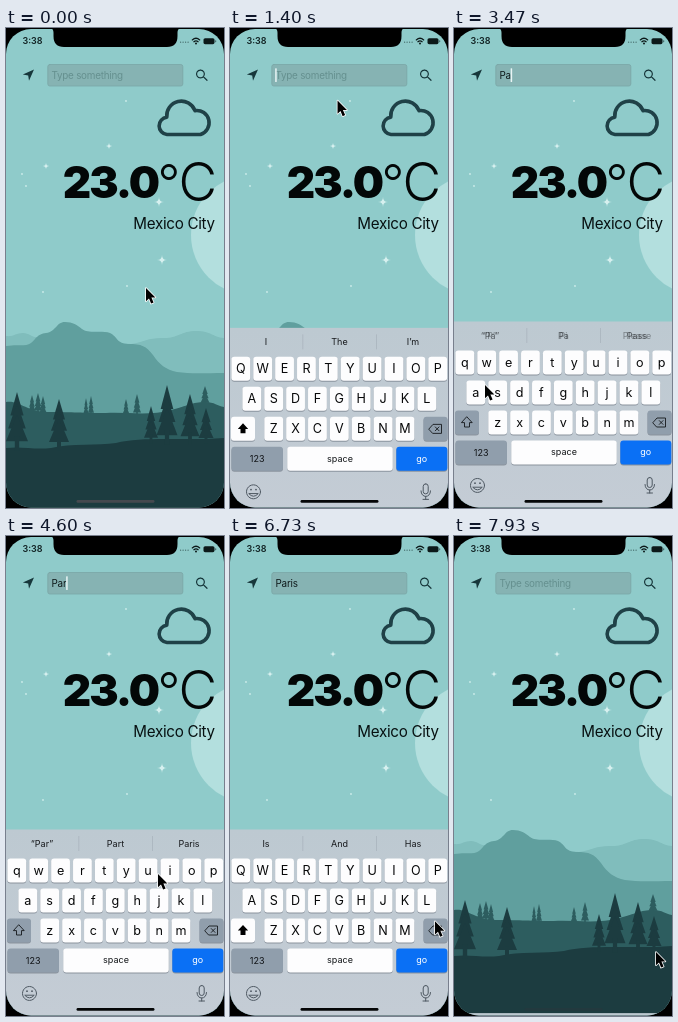
An HTML page with a canvas that plays this animation: 218 by 480 pixels, repeating every 8000 ms.

```html
<!DOCTYPE html>
<html lang="en">
<head>
<meta charset="utf-8">
<title>Weather search</title>
<style>
html, body { margin: 0; width: 100%; height: 100%; overflow: hidden; background: #000; }
canvas { display: block; width: 100%; height: 100%; }
</style>
</head>
<body>
<canvas id="stage"></canvas>
<script>
const W = 218, H = 480, LOOP = 8000, KEYS_TOP = 293.5;
const canvas = document.getElementById('stage');
const c = canvas.getContext('2d');
const dpr = window.devicePixelRatio || 1;
canvas.width = W * dpr;
canvas.height = H * dpr;

const DARK = '#1c3c40';
const FONT = 'Inter, Roboto, sans-serif';
const SHOW = 1112, HIDE = 7590;

// Typing steps: start time, field text, capitals on, suggestions
const steps = [
  [0, '', true, ['I', 'The', 'I’m']],
  [2480, 'P', false, ['“P”', 'Pi', 'Please']],
  [3370, 'Pa', false, ['“Pa”', 'Pa', 'Pass']],
  [4190, 'Par', false, ['“Par”', 'Part', 'Paris']],
  [4760, 'Pari', false, ['“Pari”', 'Party', 'Paris']],
  [5190, 'Paris', false, ['“Paris”', 'Parish', 'Paris']],
  [6210, 'Paris ', true, ['Is', 'And', 'Has']],
  [6860, 'Paris', false, ['“Paris”', 'Parish', 'Paris']],
  [7480, '', true, ['I', 'The', 'I’m']]
];

// Key presses: start, end, key
const presses = [
  [2400, 2480, 'P'], [3290, 3370, 'a'], [4110, 4190, 'r'], [4680, 4760, 'i'],
  [5110, 5190, 's'], [6770, 6860, 'del'], [7390, 7480, 'go']
];

// Pointer path: time, x, y
const path = [
  [0, 140, 260], [300, 140, 260], [900, 98, 45], [1250, 98, 45],
  [2050, 200, 340], [2500, 202, 338], [2650, 202, 338], [3250, 25, 362],
  [3380, 26, 361], [3470, 31, 357], [3950, 76, 338], [4220, 76, 338],
  [4600, 152, 338], [4670, 161, 337], [4790, 161, 337], [5090, 44, 364],
  [5220, 44, 364], [5750, 205, 391], [5850, 205, 391], [6130, 186, 307],
  [6250, 186, 307], [6660, 205, 385], [6880, 205, 386], [7250, 202, 416],
  [8000, 202, 416]
];

const clamp = v => Math.max(0, Math.min(1, v));
const smooth = v => v * v * (3 - 2 * v);
const spring = ms => {
  const k = Math.max(0, ms) * 0.018;
  return 1 - (1 + k) * Math.exp(-k);
};

function text(s, x, y, size, color, align = 'center', weight = 400, spacing = 0) {
  c.font = `${weight} ${size}px ${FONT}`;
  c.letterSpacing = spacing + 'px';
  c.textAlign = align;
  c.fillStyle = color;
  c.fillText(s, x, y);
  const width = c.measureText(s).width;
  c.letterSpacing = '0px';
  return width;
}

function box(x, y, w, h, r, color) {
  c.beginPath();
  c.roundRect(x, y, w, h, r);
  c.fillStyle = color;
  c.fill();
}

function disc(x, y, r, color) {
  c.beginPath();
  c.arc(x, y, r, 0, 7);
  c.fillStyle = color;
  c.fill();
}

function shape(d, color) {
  c.fillStyle = color;
  c.fill(new Path2D(d));
}

function line(d, color, width) {
  c.strokeStyle = color;
  c.lineWidth = width;
  c.lineCap = c.lineJoin = 'round';
  c.stroke(new Path2D(d));
}

function sparkle(x, y, r) {
  c.beginPath();
  c.moveTo(x, y - r);
  for (const [dx, dy] of [[r, 0], [0, r], [-r, 0], [0, -r]])
    c.quadraticCurveTo(x, y, x + dx, y + dy);
  c.fillStyle = '#d6f0ef';
  c.fill();
}

function tree(x, top, base, w, color) {
  const h = base - top, tiers = 3;
  c.fillStyle = color;
  for (let i = 0; i < tiers; i++) {
    const half = w / 2 * (0.6 + 0.2 * i);
    const y0 = top + h * 0.2 * i, y1 = top + h * (0.42 + 0.23 * i);
    c.beginPath();
    c.moveTo(x, y0);
    c.lineTo(x + half, y1);
    c.lineTo(x - half, y1);
    c.fill();
  }
  c.fillRect(x - w * 0.1, top + h * 0.8, w * 0.2, h * 0.25);
}

function scenery() {
  c.fillStyle = '#8fcbca';
  c.fillRect(0, 0, W, H);
  disc(245, 207, 60, '#b3dfde');
  sparkle(103, 118, 3.5);
  sparkle(40, 138, 3.5);
  sparkle(153, 174, 5);
  sparkle(156, 232, 5);
  for (const [x, y] of [[20, 158], [37, 264], [121, 258], [16, 146], [120, 73]])
    disc(x, y, 0.9, '#cdeceb');

  shape('M0 308C7 309 10 305 17 305C24 305 25 310 33 309L125 316C138 314 142 310 155 310C172 311 174 303 190 303C206 303 206 309 218 310V400H0Z', '#80bdbc');
  shape('M0 318C12 316 19 319 25 315C30 311 31 306 40 305C50 304 50 294 59 294C67 294 71 297 76 301C82 306 96 302 104 305C112 309 110 315 122 316C136 316 140 318 147 327C153 336 160 342 171 344C184 346 200 345 218 345V400H0Z', '#609f9e');

  const mid = '#2d5d5f';
  for (const [x, top, base, w] of [[26, 367, 385, 7], [32, 365, 385, 8], [37, 368, 387, 7],
    [80, 370, 387, 5], [85, 368, 387, 6], [120, 371, 387, 6], [131, 366, 387, 8], [199, 358, 377, 9]])
    tree(x, top, base, w, mid);
  shape('M0 374C14 372 20 384 42 384C68 384 76 385 100 385C122 384 145 388 165 382C182 378 186 374 199 374C209 374 211 378 218 379V440H0Z', mid);
  shape('M0 420C16 418 28 422 45 420C65 415 92 418 110 415C136 408 180 413 218 410V480H0Z', DARK);
  for (const [x, top, base, w] of [[11, 364, 420, 22], [53, 371, 420, 20],
    [145, 378, 414, 14], [161, 357, 414, 21], [184, 366, 414, 19], [200, 380, 414, 15]])
    tree(x, top, base, w, DARK);
}

function weather() {
  line('M161 106.5A8.7 8.7 0 0 1 160.8 89.2A14.6 14.6 0 0 1 189 82.6A12.3 12.3 0 0 1 194.5 106.5Z', '#1f4147', 3.6);
  text('23.0', 56.8, 170, 44, '#030707', 'left', 900, -2);
  text('°', 163, 173, 50, '#030707', 'center', 300);
  text('C', 211, 173, 53, '#030707', 'right', 300);
  text('Mexico City', 208.8, 201, 15.2, '#071011', 'right', 400, -0.3);
}

function searchBar(t, step) {
  shape('M28 41.5L16.8 46.6L22.2 47.4L23 52.8Z', '#17373b');
  line('M194.4 42.1A3.9 3.9 0 1 0 194.5 42.1M197.4 48.8L201 52.3', '#17373b', 1.2);
  box(41.8, 36.5, 135, 21.5, 2, '#86b3b3');
  c.strokeStyle = '#7aa6a6';
  c.lineWidth = 0.8;
  c.stroke();
  const value = step[1];
  let w = 0;
  if (value) w = text(value, 45.5, 51, 9.9, '#101b1c', 'left', 400, -0.2);
  else text('Type something', 45.5, 51, 9.9, '#65908f', 'left', 400, -0.25);

  const since = t - Math.max(step[0], SHOW - 20);
  if (t > SHOW - 20 && t < 7480 && since % 1000 < 520)
    box(45.2 + w, 40.3, 1.5, 13.7, 0.5, '#e9f5f5');
}

function statusBar() {
  shape('M43 0C46.5 0 47.5 2 47.5 5V8Q47.5 19 58 19H161Q171.5 19 171.5 8V5C171.5 2 172.5 0 176 0Z', '#000');
  text('3:38', 26.5, 16.4, 9, '#122324', 'center', 600);
  for (let i = 0; i < 4; i++) disc(174.6 + i * 2.5, 14.2, 0.65, '#426867');
  line('M186.3 11.9Q190 8.7 193.7 11.9M187.9 13.7Q190 12 192.1 13.7', '#0c1919', 1.3);
  disc(190, 15.4, 1, '#0c1919');
  box(197.5, 10.2, 11, 6, 1.6, '#0c1919');
  box(209.2, 12.2, 1, 2, 0.5, '#3a5b5b');
}

function key(x, y, w, fill = '#fdfdfe') {
  box(x - w / 2, y - 11, w, 24, 3, '#8b949e');
  box(x - w / 2, y - 12, w, 24, 3, fill);
}

function keyPositions(caps) {
  const list = [];
  [['qwertyuiop', 10.8, 334.5], ['asdfghjkl', 21.8, 364.5], ['zxcvbnm', 43.7, 394.5]]
    .forEach(([row, x, y]) => [...row].forEach((ch, i) =>
      list.push([caps ? ch.toUpperCase() : ch, x + i * 21.88, y])));
  return list;
}

function suggestions(t, i) {
  const mix = clamp((t - steps[i][0]) / 170);
  const draw = (words, alpha) => {
    c.globalAlpha = alpha;
    words.forEach((s, k) => text(s, 36 + 73.5 * k, 311, 9, '#17191c'));
    c.globalAlpha = 1;
  };
  if (i && mix < 1) draw(steps[i - 1][3], 1 - mix);
  draw(steps[i][3], i ? mix : 1);
  c.fillStyle = '#a7b1bb';
  c.fillRect(72.5, 300, 0.7, 15);
  c.fillRect(146, 300, 0.7, 15);
}

function keyboard(t, i) {
  const shown = t < 4000 ? spring(t - SHOW) : 1 - spring(t - HIDE);
  if (shown <= 0.003) return;
  const caps = steps[i][2];
  const press = presses.find(p => t >= p[0] && t < p[1] + 30);
  const down = press ? press[2] : '';
  const grey = '#909eac';

  c.save();
  c.translate(0, (1 - shown) * (H - KEYS_TOP));
  const back = c.createLinearGradient(0, KEYS_TOP, 0, H);
  back.addColorStop(0, '#bdc9d1');
  back.addColorStop(1, '#c4ccd5');
  c.fillStyle = back;
  c.fillRect(0, KEYS_TOP, W, H);
  suggestions(t, i);

  const letters = keyPositions(caps);
  for (const [ch, x, y] of letters) {
    key(x, y, 18.8);
    text(ch, x, y + 4.4, 12.6, '#08090a');
  }

  key(13, 394.5, 24, caps ? '#fdfdfe' : grey);
  const arrow = 'M13 389L18.2 394.6H15.5V399H10.5V394.6H7.8Z';
  if (caps) shape(arrow, '#000');
  else line(arrow, '#16191c', 0.9);
  key(205.5, 394.5, 24, down === 'del' ? '#fdfdfe' : grey);
  line('M199 394.5L203 390H211.5V399H203ZM205.3 392.6L209 396.4M209 392.6L205.3 396.4', '#16191c', 0.9);

  key(27.2, 424.5, 51.5, grey);
  text('123', 27.2, 427.5, 9, '#111417');
  key(110, 424.5, 105.5);
  text('space', 110, 427.2, 9, '#111417');
  key(191.8, 424.5, 51, down === 'go' ? '#fdfdfe' : '#0a70f5');
  text('go', 191.8, 427.2, 9, down === 'go' ? '#111417' : '#fff');

  line('M30.5 457.5A7 7 0 1 1 30.5 457.4M19 459.5Q23.5 464.5 28 459.5Z', '#4e5862', 1);
  disc(21, 455.2, 0.9, '#4e5862');
  disc(26, 455.2, 0.9, '#4e5862');
  c.beginPath();
  c.roundRect(193.2, 449.5, 5, 10, 2.5);
  c.stroke();
  line('M191 456.5C191 464 200.5 464 200.5 456.5M195.7 462V465M193 465H198.5', '#4e5862', 1);

  const popped = letters.find(l => l[0].toLowerCase() === down.toLowerCase());
  if (popped) {
    const [, x, y] = popped;
    const px = Math.max(16, Math.min(W - 16, x));
    box(px - 15, y - 43, 30, 31, 5, '#fdfdfe');
    box(x - 9.4, y - 16, 18.8, 28, 3, '#fdfdfe');
    text(down, px, y - 21, 20, '#08090a');
  }
  c.restore();
}

function homeBar(t) {
  let color = '#45494f';
  if (t > SHOW && t < HIDE + 240) color = '#050607';
  else if (t >= HIDE + 240) color = '#22393e';
  box(70.5, 472, 78, 2.8, 1.4, color);
}

function pointer(t) {
  let i = 0;
  while (i < path.length - 2 && t >= path[i + 1][0]) i++;
  const [t0, x0, y0] = path[i], [t1, x1, y1] = path[i + 1];
  const k = smooth(clamp((t - t0) / (t1 - t0)));
  c.save();
  c.translate(x0 + (x1 - x0) * k, y0 + (y1 - y0) * k);
  const d = 'M0 0V13.2L3 10.4L5.1 15.6L7.6 14.5L5.4 9.5H9.4Z';
  line(d, '#fff', 1.6);
  shape(d, '#000');
  c.restore();
}

function frame(t) {
  c.setTransform(dpr, 0, 0, dpr, 0, 0);
  c.textBaseline = 'alphabetic';
  let i = steps.length - 1;
  while (steps[i][0] > t) i--;

  c.fillStyle = '#000';
  c.fillRect(0, 0, W, H);
  c.save();
  c.beginPath();
  c.roundRect(0, 1, W, 478.5, 25);
  c.clip();
  scenery();
  weather();
  searchBar(t, steps[i]);
  statusBar();
  keyboard(t, i);
  homeBar(t);
  c.restore();
  pointer(t);
}

const start = performance.now();
function tick() {
  frame((performance.now() - start) % LOOP);
  requestAnimationFrame(tick);
}
tick();
</script>
</body>
</html>
```
